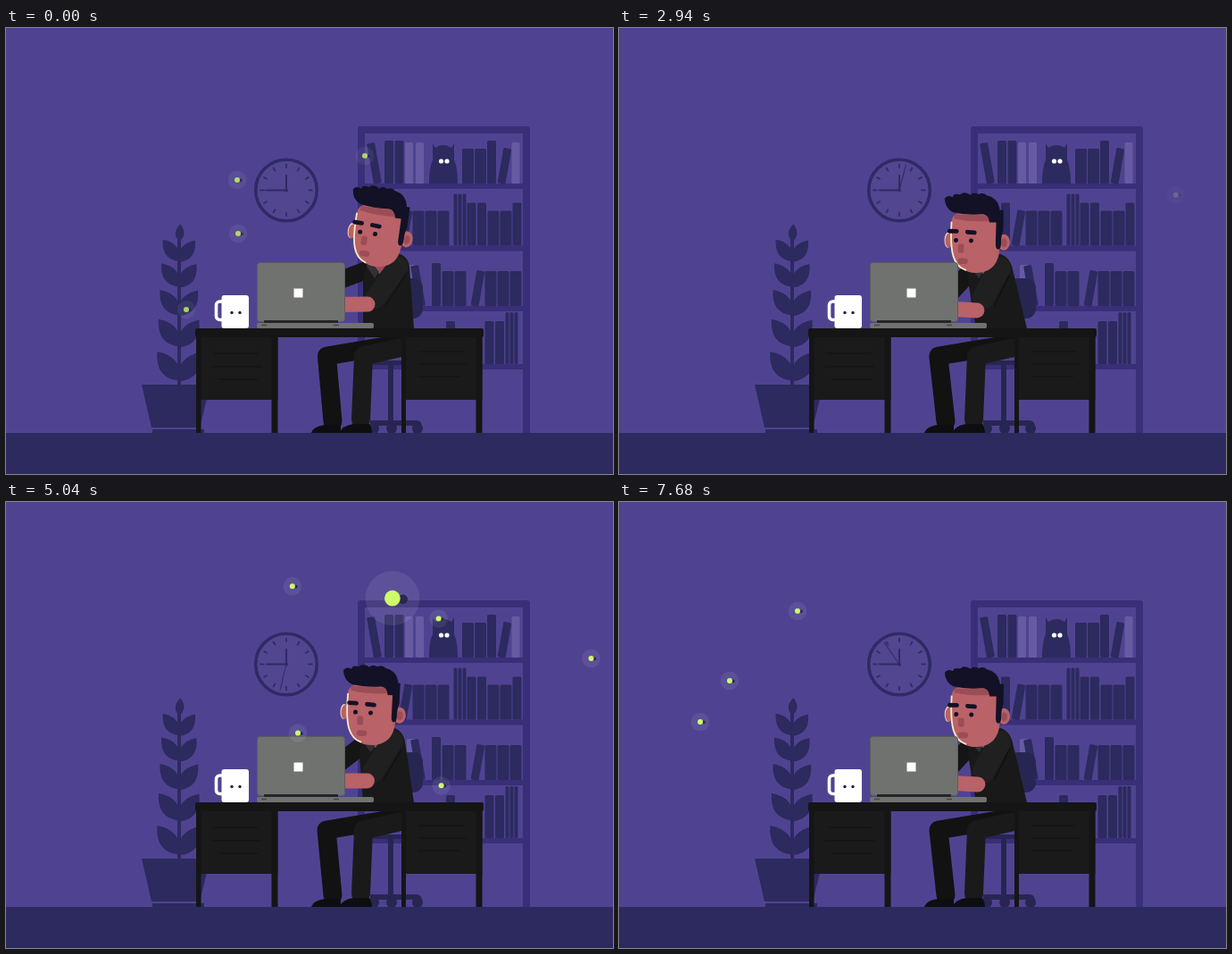
Write an HTML page that moves like this. It is 680 px wide and 499 px high and loops after 7.76 s.

```html
<!DOCTYPE html>
<html lang="en">
<head>
<meta charset="utf-8">
<title>Night shift</title>
<style>
  html, body { margin: 0; width: 100%; height: 100%; overflow: hidden; background: #4f4391; }
  svg { display: block; width: 680px; height: 499px; }
  .navy { fill: #2c2a5e; }
  .shelf { fill: #382f78; }
  .lit { fill: #665ba3; }
  .chair { fill: #272652; }
  .ink { fill: #151516; }
  .coat { fill: #191919; }
  .skin { fill: #b96267; }
  .shade { fill: #9b4d57; }
  .hair { fill: #131126; }
  .line { fill: none; stroke-linecap: round; stroke-linejoin: round; }
</style>
</head>
<body>
<svg viewBox="0 0 680 499">
  <rect width="680" height="499" fill="#4f4391"/>

  <g class="navy">
    <path d="M192 235h4v165h-4zM152 399h77l-12 48h-54z"/>
    <rect x="164" y="449" width="58" height="5"/>
    <g id="leaves"></g>
  </g>

  <path class="shelf" fill-rule="evenodd" d="M397 110h187q3 0 3 3v340h-8V118H402v335h-8V113q0-3 3-3z"/>
  <g id="books"></g>
  <path class="navy" d="M474 174q0-18 4-26v-19l3 5q9-6 18 0l3-5v19q4 8 4 26z"/>
  <g fill="#fff"><circle cx="487.5" cy="149" r="2.600"/><circle cx="494" cy="149" r="2.600"/></g>

  <g class="line" stroke="#2f2a66">
    <circle cx="314" cy="181.500" r="34.300" stroke-width="3.600" fill="#51468f"/>
    <circle cx="314" cy="181.500" r="27" stroke-width="5" stroke-linecap="butt"
      pathLength="12" stroke-dasharray="0.120 0.880" stroke-dashoffset="0.060"/>
    <path d="M314 165V181.500H292" stroke-width="2"/>
    <path id="second" d="M314 181.500V152" stroke-width="1"/>
    <circle cx="314" cy="181.500" r="2" fill="#2f2a66" stroke="none"/>
  </g>

  <g class="chair">
    <rect x="436" y="280" width="31" height="45" rx="11"/>
    <path d="M398 372h50v5h-50zM428 375h6v67h-6zM408 439h52q5 0 6 6h-58z"/>
    <circle cx="412" cy="448" r="6"/><circle cx="432" cy="448" r="6"/><circle cx="461" cy="448" r="6"/>
  </g>

  <rect y="453" width="680" height="46" fill="#2d2a5f"/>

  <g class="line" stroke-width="21">
    <path id="farLeg" stroke="#121213"/>
    <path d="M440 358L400.500 367L397.500 438" stroke="#1a1a1a"/>
  </g>
  <path fill="#0e0e10" d="M342 453q2-7 15-9h18v9zM374 453q2-8 15-10h18q3 4 3 10z"/>

  <path id="farArm" class="line" stroke="#151516" stroke-width="20"/>
  <g id="body">
    <path class="coat" d="M400 337v-55q1-20 14-26l24-4q12 2 14 15l5 70z"/>
    <path class="shade" d="M407 258l28-5-10 18-7 4z"/>
    <path fill="#313133" d="M406 258l12 15-5 7-9-13zM437 252l-18 22 3 8 16-18z"/>
    <path class="line" stroke="#202021" stroke-width="23" d="M439 267L413 303"/>
    <path class="line" stroke="#0f0f10" d="M447 277L425 311"/>
  </g>
  <path id="forearm" class="line" stroke="#b96267" stroke-width="17"/>

  <g id="head">
    <ellipse cx="-30.500" rx="4" ry="8.500" fill="#f0d9b8"/>
    <ellipse class="skin" cx="-29.500" cy="0.500" rx="4" ry="8"/>
    <path id="face" class="skin" stroke="#f5ebc4" stroke-width="0"
      d="M-27-20Q-27-31-14-31H18Q28-30 27.500-18V10Q26 34 3 36Q-17 37-24 18Q-28 6-27-20z"/>
    <path class="line" stroke="#f5ebc4" stroke-width="1.800" d="M-27-20Q-28 6-24 18Q-20 30-10 33"/>
    <ellipse class="skin" cx="32" cy="1" rx="7" ry="9"/>
    <ellipse class="shade" cx="32.500" cy="1.500" rx="3.500" ry="5"/>
    <path class="shade" d="M-24-29H20v6Q-2-20-24-24z"/>
    <g id="features">
      <path class="line" stroke="#131126" stroke-width="4.800" d="M-16-10l8 0M4-9.500l8 0.500"/>
      <circle class="hair" cx="-8.500" r="2.500"/><circle class="hair" cx="8.500" r="2.500"/>
      <rect class="shade" x="-6" y="4" width="6.500" height="10" rx="2"/>
      <rect class="shade" x="-6" y="20" width="11.500" height="6.500" rx="3.200"/>
    </g>
    <path class="hair" d="M20-35H31V-12Q29-8 29 3q0 6-3 6t-3-6V-20z"/>
    <path id="quiff" class="hair" d="M-30-46q3-5 9-2 1-5 8-3 5-5 12 0 3-4 9-1 5-3 9 1 12 2 15 14v12l-4 4h-7q-1-9-8-9-18 2-33-1-9-4-10-15z"/>
  </g>

  <path fill="#1a1a1b" d="M213 346h91.500v70H213zM443 346h90.500v70H443z"/>
  <path class="ink" d="M213 346h5.500v107H213zM297.500 346h7v107h-7zM443 346h5v107h-5zM526.500 346h7v107h-7z"/>
  <path class="line" stroke="#111112" d="M233 364h49M231 379h55M238 393h44M462 362h50M462 376h54M462 390h47"/>
  <rect class="ink" x="212" y="336" width="323" height="10" rx="2"/>

  <rect x="281.500" y="262.500" width="98" height="66" rx="3" fill="#70726f" stroke="#5b5d5e"/>
  <rect x="289" y="327" width="83" height="3" fill="#252527"/>
  <rect x="281" y="330" width="131" height="6" rx="2" fill="#70726f"/>
  <path d="M286 332.500h6M367 332.500h6" stroke="#454748" stroke-width="1.500"/>
  <rect x="322.500" y="291.500" width="10" height="10" fill="#fff"/>

  <rect x="235.500" y="306" width="12" height="20.500" rx="4" fill="none" stroke="#fff" stroke-width="3.600"/>
  <rect x="241.500" y="299" width="30.500" height="37" rx="3" fill="#fff"/>
  <circle cx="253" cy="318.500" r="1.700" fill="#242040"/><circle cx="262" cy="318.500" r="1.700" fill="#242040"/>

  <g id="flies"></g>
</svg>
<script>
const $ = id => document.getElementById(id);
const set = (el, attrs) => { for (const k in attrs) el.setAttribute(k, attrs[k]); return el; };
const add = (parent, tag, attrs = {}) =>
  parent.appendChild(set(document.createElementNS('http://www.w3.org/2000/svg', tag), attrs));
const clamp = v => Math.max(0, Math.min(1, v));

// Plant: leaf pairs that grow and spread towards the pot
function leaf(y, turn, size) {
  add($('leaves'), 'path', {
    d: 'M0 0Q-16-15 0-33Q16-15 0 0z',
    transform: `translate(194 ${y}) rotate(${turn}) scale(${size})`
  });
}
leaf(239, 4, 0.6);
for (let i = 0; i < 5; i++) {
  const y = 261 + 27 * i + 1.6 * i * i, size = 0.92 + 0.08 * i;
  leaf(y, -37, size);
  leaf(y + 1, 36, size);
}

// Books by kind: thick, tall, slim, lit, leaning either way
const kinds = {
  m: { w: 13, h: 39, pitch: 14 },
  b: { w: 10, h: 48, pitch: 11.5 },
  s: { w: 4, h: 58, pitch: 5 },
  l: { w: 9, h: 46, pitch: 12, lit: true },
  '<': { w: 9, h: 46, pitch: 12, tilt: -10 },
  '>': { w: 9, h: 40, pitch: 16, tilt: 10 },
  ' ': { pitch: 4 }
};
function shelf(base, x, row) {
  add($('books'), 'rect', { x: 400, y: base, width: 181, height: 6, class: 'shelf' });
  for (const key of row) {
    const { w, h, pitch, lit, tilt = 0 } = kinds[key];
    if (w) add($('books'), 'rect', {
      x, y: base - h, width: w, height: h, rx: 1.5,
      class: lit ? 'lit' : 'navy', transform: `rotate(${tilt} ${x + w / 2} ${base})`
    });
    x += pitch;
  }
}
shelf(174, 412, '<bbll          mmb>l');
shelf(243.5, 428, 'b>mmm sssbbmmb');
shelf(311, 449, 'l< bmm >mmm');
shelf(376, 493, 'b        bbsss');

// One scene cycle, counted in steps; the loop shows it almost twice
const CYCLE = 53.6;
const pose = (x, y, tilt, gaze, elbowX, elbowY) => [x, y, tilt, gaze, elbowX, elbowY];
const lookUp = pose(417, 231, 8, -12, 405, 309);
const lookDown = pose(409, 236, 3, -9, 404, 312);
const rest = pose(415, 232, 0, -2.5, 404, 306);
const typing = pose(399, 238, 1.5, -13, 401, 316);
const reach = pose(405, 238, 0, -9.5, 418, 312);
const acts = [[0, lookUp], [9, lookDown], [15, lookDown], [22, rest], [28, rest],
  [33, typing], [45, typing], [49, reach], [CYCLE, lookUp]];

function poseAt(p) {
  const i = acts.findIndex(([t]) => t > p);
  const [t0, a] = acts[i - 1], [t1, b] = acts[i];
  const u = (p - t0) / (t1 - t0), e = u * u * (3 - 2 * u);
  return a.map((v, k) => v + (b[k] - v) * e);
}

// Polynomial through the values at the given times
const curve = (times, values, t) => times.reduce((sum, ti, i) =>
  sum + times.reduce((f, tj, j) => j === i ? f : f * (t - tj) / (ti - tj), values[i]), 0);

const flies = [];
function fly(start, end, times, xs, ys, scale = 1) {
  const g = add($('flies'), 'g');
  add(g, 'circle', { r: 10.3, fill: '#fff', opacity: 0.08 });
  add(g, 'circle', { cx: 4, cy: 0.4, r: 1.8, fill: '#2b2850' });
  add(g, 'circle', { r: 3, fill: '#cffa68' });
  flies.push({ g, start, end, times, xs, ys, scale });
}
const swarm = [45.4, 49, CYCLE, 64.6];
fly(41, 67, swarm, [200, 288, 402, 648], [122, 121, 143, 177]);
fly(44, 69, swarm, [91, 165, 259, 477], [246, 213, 170, 129]);
fly(43, 70, swarm, [124, 193, 260, 475], [200, 211, 230, 313]);
fly(48, 92, [49, CYCLE, 64.6, 80.6, 87], [76, 202, 324, 503, 591], [301, 315, 261, 213, 208]);
fly(4, 20, [11, 20], [312, 510], [94, 98]);
fly(3, 17, [11, 16], [410, 696], [107, 115], 2.95);
fly(19, 36, [22, 27, 33.4], [207, 416, 620], [130, 147, 177]);

function drawFly({ g, start, end, times, xs, ys, scale }, p) {
  const t = p < start ? p + CYCLE : p;
  const fade = clamp(t - start) * clamp((end - t) / 2);
  const twinkle = 1 - 0.2 * Math.cos(2 * Math.PI * p / CYCLE) ** 16;
  set(g, {
    transform: `translate(${curve(times, xs, t)} ${curve(times, ys, t)}) scale(${scale})`,
    opacity: fade * twinkle
  });
}

function draw(p) {
  const [x, y, tilt, gaze, ex, ey] = poseAt(p);
  set($('head'), { transform: `translate(${x} ${y}) rotate(${tilt})` });
  set($('features'), { transform: `translate(${gaze} 0)` });
  set($('quiff'), { transform: `translate(${gaze / 2 + 1} 0)` });

  // The torso leans with the head, hinged at the desk top
  const lean = (x - 417) * 0.7, k = -lean / 74;
  set($('body'), { transform: `matrix(1 0 ${k} 1 ${-k * 336} 0)` });
  set($('farArm'), { d: `M${409 + lean} 269L372 ${299 - 2 * tilt}` });

  const stretch = ex - 404, tap = Math.sin(p * 2.4) * 0.6;
  set($('forearm'), { d: `M372 ${ey + stretch * 0.6}L${ex + tap} ${ey}` });
  set($('farLeg'), { d: `M436 354L${359 + stretch * 0.4} 367L366 440` });
  set($('second'), { transform: `rotate(${270 - 360 * p / CYCLE} 314 181.500)` });
  for (const f of flies) drawFly(f, p);
}

// The picture advances in 100 even steps per loop
const LOOP = 7760, STEPS = 100;
const begin = performance.now();
function tick() {
  const t = (performance.now() - begin) % LOOP;
  const step = Math.min(STEPS - 1, Math.floor((t + 20) / LOOP * STEPS));
  draw(step % CYCLE);
  requestAnimationFrame(tick);
}
tick();
</script>
</body>
</html>
```
